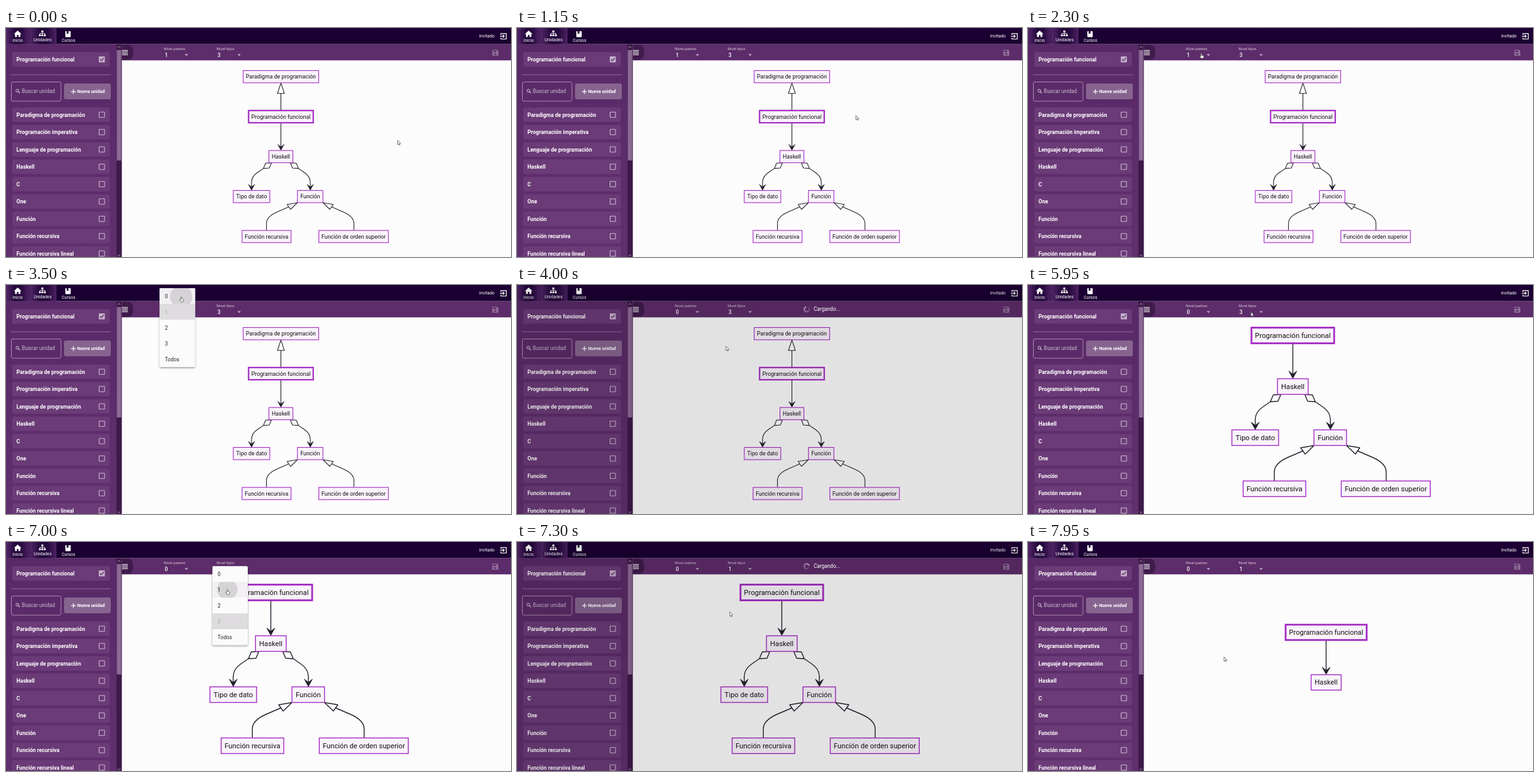
These frames come from a looping animation (800 px wide and 363 px high, 8000 ms). An HTML page:

```html
<!DOCTYPE html>
<html lang="es">
<head>
<meta charset="utf-8">
<style>
html, body { margin: 0; width: 100%; height: 100%; overflow: hidden; background: #fdfcfd; }
svg { display: block; width: 800px; height: 363px; font-family: Roboto, sans-serif; }
text { white-space: pre; }
</style>
</head>
<body>
<svg id="stage" viewBox="0 0 800 363"></svg>
<script>
const LOOP = 8000;
const stage = document.getElementById('stage');
const $ = id => document.getElementById(id);
const set = (id, attrs) => Object.entries(attrs).forEach(([k, v]) => $(id).setAttribute(k, v));
const show = (id, visible) => set(id, { visibility: visible ? 'visible' : 'hidden' });
const clamp = v => Math.max(0, Math.min(1, v));

const text = (x, y, size, str, attrs = '') =>
  `<text x="${x}" y="${y}" font-size="${size}" fill="#fff" ${attrs}>${str}</text>`;
const rect = (x, y, w, h, fill, attrs = '') =>
  `<rect x="${x}" y="${y}" width="${w}" height="${h}" fill="${fill}" ${attrs}/>`;
const path = (d, fill, attrs = '') => `<path d="${d}" fill="${fill}" ${attrs}/>`;
const BOLD = 'font-weight="700"';
const MEDIUM = 'font-weight="500"';
const MIDDLE = 'text-anchor="middle"';

// ---- Header, sidebar and toolbar
function header() {
  return rect(0, 0, 800, 25.5, 'url(#bar)') +
    rect(0, 0, 36, 25.5, 'url(#tab)') + rect(36.5, 0, 43.5, 25.5, 'url(#tab)') +
    path('M18.5 4l-6 5.5h1.8v4.7h3v-3.3h2.4v3.3h3V9.5h1.8z', '#fff') +
    path('M56 4h3.2v2.7H56zM52.2 10.2h3v2.7h-3zM56.1 10.2h3v2.7h-3zM60 10.2h3v2.7h-3z', '#fff') +
    path('M57.6 6.5v4M53.7 10.2V8.5h7.8v1.7', 'none', 'stroke="#fff" stroke-width=".8"') +
    rect(94, 5, 8.5, 9.5, '#fff', 'rx="1"') + path('M96 5h3v4.5l-1.5-1-1.5 1z', '#2a0c42') +
    text(18.5, 21.8, 6.8, 'Inicio', MIDDLE) +
    text(58, 21.3, 6.8, 'Unidades', MIDDLE) +
    text(99, 21.8, 6.8, 'Cursos', MIDDLE) +
    text(774, 15.3, 6.9, 'invitado', 'text-anchor="end"') +
    path('M784 11V8.8h8.5v8.7H784v-2.2M782.5 13.1h6.5M787 10.8l2.3 2.3-2.3 2.3',
      'none', 'stroke="#fff" stroke-width="1.2"');
}

function unitCard(y, name, checked) {
  const box = checked
    ? rect(147, y - 4.8, 9.6, 9.6, '#c5b0ca', 'rx="1"') +
      path(`M149 ${y}l2 2.2 4-4.4`, 'none', 'stroke="#5e2e6c" stroke-width="1.3"')
    : rect(147.5, y - 4.3, 8.6, 8.6, 'none', 'rx=".8" stroke="#cbb9d0" stroke-width="1.1"');
  return rect(10, y - 11.5, 154.5, 23, '#6b3b78', 'rx="3"') + text(16.5, y + 3, 8.55, name, BOLD) + box;
}

function sidebar() {
  const units = ['Paradigma de programación', 'Programación imperativa', 'Lenguaje de programación',
    'Haskell', 'C', 'One', 'Función', 'Función recursiva', 'Función recursiva lineal'];
  return rect(0, 25.5, 175, 338, 'url(#side)') +
    unitCard(49.7, 'Programación funcional', true) +
    rect(8, 73.7, 158, 1, '#8d6b96') +
    rect(8.5, 85.5, 78.5, 30.5, 'none', 'rx="2.5" stroke="#a78cae"') +
    '<circle cx="18" cy="99.3" r="2.2" fill="none" stroke="#d8c9dc"/>' +
    path('M19.7 101l2.3 2.4', 'none', 'stroke="#d8c9dc" stroke-width="1.2"') +
    text(25, 103.3, 8.3, 'Buscar unidad', 'fill-opacity=".68"') +
    rect(92, 88, 74, 25, '#87648f', 'rx="3"') +
    path('M103 100.8h7.5M106.75 97v7.5', 'none', 'stroke="#fff" stroke-width="1.2"') +
    text(112.7, 103.4, 7.15, 'Nueva unidad', BOLD) +
    units.map((name, i) => unitCard(137.5 + 27.5 * i, name)).join('') +
    rect(175, 25.5, 8.5, 338, '#3d1a49') + rect(175.5, 35, 7, 175, '#8b6a95') +
    path('M177 31.5l2-2.5 2 2.5M177 359l2 2.5 2-2.5', 'none', 'stroke="#a58dad"');
}

function select(x, label, id) {
  return text(x, 35.2, 6.2, label, 'fill-opacity=".75"') +
    text(x + 1.5, 45.7, 8.5, '', `id="${id}" ${MEDIUM}`) +
    path(`M${x + 33} 41.5h5.6l-2.8 2.8z`, '#c6b4cb');
}

function toolbar() {
  return rect(183.5, 25.5, 617, 25.8, '#5d2c6a') +
    path('M183.5 26.5h9q9 0 9 12t-9 12h-9z', '#3f1b4b') +
    path('M183.5 35.5h9.5M183.5 37.8h9.5M183.5 40.1h9.5M183.5 42.4h9.5', 'none', 'stroke="#fff"') +
    select(250, 'Nivel padres', 'parents') + select(333.5, 'Nivel hijos', 'children') +
    path('M771.5 34.5h6.5l2 2v6.5q0 1-1 1h-7.5q-1.2 0-1.2-1V35.5q0-1 1.2-1z', '#8e6d97') +
    rect(771.5, 35.7, 5, 2.3, '#5d2c6a') + '<circle cx="775" cy="41.3" r="1.5" fill="#5d2c6a"/>';
}

// ---- Diagram, in units relative to the main node
const LINE = 'stroke="#22202c" stroke-width="1.4" stroke-linejoin="round"';
const node = (x, row, half, name, main) =>
  rect(x - half, row * 81 - 12.4, half * 2, 24.8, '#f9f3fb',
    `stroke="#a32bc2" stroke-width="${main ? 2.8 : 1.4}"`) +
  text(x, row * 81 + 4, 11.27, name, MIDDLE + ' style="fill:#111"');
const arrowHead = (x, y) => path(`M${x} ${y}l-6.3-11.5 6.3 5 6.3-5z`, '#22202c', 'stroke="#22202c" stroke-width=".9"');
const mirrored = (axis, part) => part + `<g transform="translate(${2 * axis}) scale(-1 1)">${part}</g>`;

// Runs straight to the middle of the first leg, rounds the corner, then drops to the end.
function bend(x0, y0, x1, y1, end) {
  return path(`M${x0} ${y0}L${(x0 + x1) / 2} ${(y0 + y1) / 2}Q${x1} ${y1} ${x1} ${(y1 + end) / 2}V${end}`, 'none', LINE);
}

const ancestors = path('M0-13V-47', 'none', LINE) + path('M0-68l-7 21h14z', '#fff', LINE) +
  node(0, -1, 76.5, 'Paradigma de programación');
const core = path('M0 13V64', 'none', LINE) + arrowHead(0, 68) +
  node(0, 0, 65.5, 'Programación funcional', true) + node(0, 1, 24.3, 'Haskell');
const descendants =
  mirrored(0, bend(-35.5, 105, -59.5, 121.5, 145) +
    path('M-19 93.5l-12 .8-4.5 10.7 12-.8z', '#fff', LINE) + arrowHead(-59.5, 149)) +
  mirrored(59.3, bend(16, 183, -29.3, 202.5, 230) +
    path('M33.5 174.5l-21 3.5 7 10z', '#fff', LINE)) +
  node(-59.5, 2, 37, 'Tipo de dato') + node(59.3, 2, 25.8, 'Función') +
  node(-29.1, 3, 49.6, 'Función recursiva') + node(147.3, 3, 70.5, 'Función de orden superior');

// ---- Drop-down menus and time line
const OPTIONS = ['0', '1', '2', '3', 'Todos'];
const MENUS = [
  { id: 'menuA', x: 243.5, y: 5, selected: 1, open: 2420, click: 3400, close: 3580 },
  { id: 'menuB', x: 327, y: 38.2, selected: 3, open: 6350, click: 6908, close: 7080 },
];
const LOADING = [[3660, 4200], [7140, 7610]];
const HAND = [[2120, 3600], [5980, 7110]];
const CURSOR = [
  [0, 620.5, 178], [300, 620.5, 178], [850, 575, 153], [2200, 274.5, 40], [2850, 274.5, 40],
  [3250, 277.5, 18.5], [3560, 277.5, 18.5], [4000, 331, 97], [4450, 390, 95.5],
  [5100, 390, 95.5], [6050, 352, 41], [6450, 352, 41], [6800, 350.5, 75], [7080, 350.5, 75],
  [7650, 310.5, 182], [8000, 310.5, 182],
];

function menu({ id, x, y, selected }) {
  const labels = OPTIONS.map((name, i) =>
    text(x + 8.3, y + 25 * i + 15.5, 8.2, name, `style="fill:${i === selected ? '#aaa' : '#222'}"`));
  return `<g id="${id}">` + rect(x, y, 56, 125, '#fcfbfc', 'rx="2" filter="url(#shadow)"') +
    rect(x, y + 25 * selected, 56, 25, '#dedcde') +
    rect(x, y, 56, 25, '#f2f0f2', `id="${id}Hover"`) +
    `<clipPath id="${id}Clip">${rect(x, y, 56, 25, '#000', `id="${id}Row"`)}</clipPath>
    <g clip-path="url(#${id}Clip)"><circle id="${id}Ripple" fill="#000" fill-opacity=".12"/></g>` +
    labels.join('') + '</g>';
}

const spokes = Array.from({ length: 12 }, (_, i) =>
  `<path d="M0-2.8V-5.2" stroke="#fff" opacity="${(i + 1) / 12}" transform="rotate(${30 * i})"/>`);

stage.innerHTML = `<defs>
  <linearGradient id="bar" x2="0" y2="1"><stop stop-color="#1d0035"/><stop offset="1" stop-color="#1a0030"/></linearGradient>
  <linearGradient id="tab"><stop stop-color="#54286a"/><stop offset=".4" stop-color="#24073c"/><stop offset=".65" stop-color="#24073c"/><stop offset="1" stop-color="#4c2262"/></linearGradient>
  <linearGradient id="side" x2="0" y2="1"><stop stop-color="#592967"/><stop offset="1" stop-color="#612f6e"/></linearGradient>
  <filter id="shadow" x="-20%" y="-20%" width="140%" height="140%"><feDropShadow dx="0" dy="1.5" stdDeviation="1.8" flood-opacity=".4"/></filter>
  </defs>` +
  rect(0, 0, 800, 363, '#fdfcfd') +
  `<g id="diagram"><g id="ancestors">${ancestors}</g><g id="descendants">${descendants}</g>${core}</g>` +
  toolbar() + sidebar() + header() +
  `<g id="loading">${rect(0, 0, 800, 363, '#000', 'opacity=".1"')}
    <g id="spinner">${spokes.join('')}</g>${text(470, 41.2, 8.2, 'Cargando...')}</g>` +
  MENUS.map(menu).join('') +
  `<g id="cursor" stroke="#444" stroke-width=".7" stroke-linejoin="round">
    ${path('M0 0v7l1.6-1.5 1 2.3 1.1-.5-1-2.2h2.1z', '#fff', 'id="arrow"')}
    ${path('M-.7.6q.7-1 1.4 0v2.7l2.6.7q.7.3.6 1L3.3 8H-.6L-2.5 5q.5-.9 1.8.2z', '#fff', 'id="hand"')}
  </g>`;

function cursorAt(t) {
  const i = Math.max(1, CURSOR.findIndex(k => k[0] > t));
  const [t0, x0, y0] = CURSOR[i - 1], [t1, x1, y1] = CURSOR[i];
  const p = (t - t0) / (t1 - t0), e = p * p * (3 - 2 * p);
  return [x0 + (x1 - x0) * e, y0 + (y1 - y0) * e];
}

function drawMenu(m, t, [cx, cy]) {
  const opening = clamp((t - m.open) / 120);
  const opacity = opening * (1 - clamp((t - m.close) / 90));
  const scale = 0.8 + 0.2 * opening;
  set(m.id, { opacity, transform: `translate(0 ${m.y * (1 - scale)}) scale(1 ${scale})` });
  const row = Math.floor((cy - m.y) / 25);
  const inside = row >= 0 && row < 5 && row !== m.selected;
  const y = m.y + 25 * row;
  set(m.id + 'Hover', { y, opacity: inside ? 1 : 0 });
  set(m.id + 'Row', { y });
  set(m.id + 'Ripple', { cx, cy, r: Math.max(0, (t - m.click) * 0.175) });
}

function draw(now) {
  const t = now % LOOP;
  const within = ([a, b]) => t >= a && t < b;
  const pos = cursorAt(t);
  const step = LOADING.filter(([, end]) => t >= end).length;
  const [x, y, scale] = [[435.5, 140.5, 0.782], [419.5, 80, 1], [472.3, 143.2, 0.98]][step];

  set('diagram', { transform: `translate(${x} ${y}) scale(${scale})` });
  show('ancestors', step === 0);
  show('descendants', step < 2);
  $('parents').textContent = t < 3450 ? 1 : 0;
  $('children').textContent = t < 6950 ? 3 : 1;
  show('loading', LOADING.some(within));
  set('spinner', { transform: `translate(459 38.5) rotate(${Math.floor(t / 83) * 30})` });
  MENUS.forEach(m => drawMenu(m, t, pos));

  const hand = HAND.some(within);
  set('cursor', { transform: `translate(${pos})` });
  show('hand', hand);
  show('arrow', !hand);
  requestAnimationFrame(draw);
}
requestAnimationFrame(draw);
</script>
</body>
</html>
```
